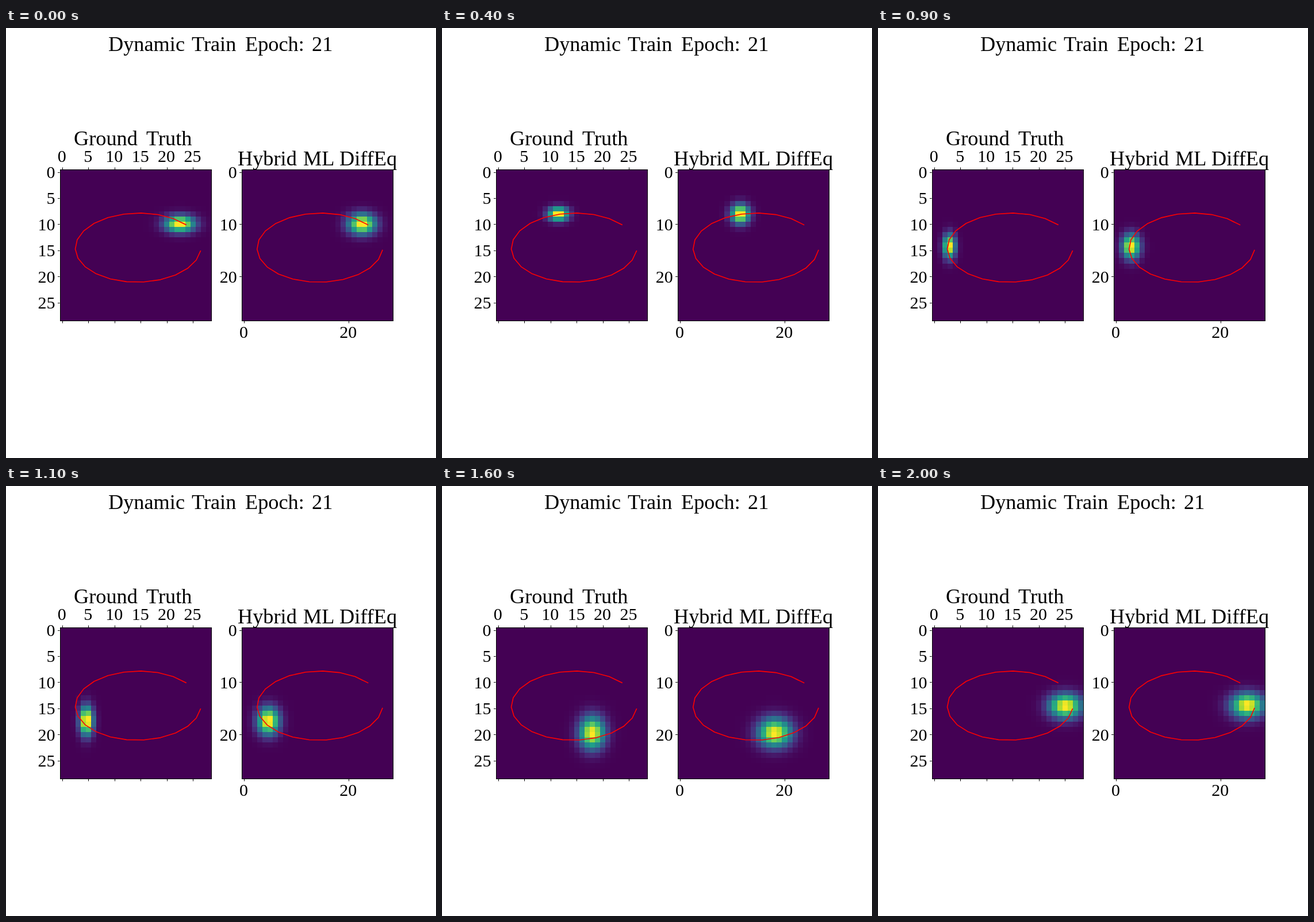
An HTML page that plays this animation: 748x748 px, repeating every 2.1 s.

```html
<!DOCTYPE html>
<html lang="en">
<head>
<meta charset="utf-8">
<title>Dynamic Train</title>
<style>
html, body { margin: 0; width: 100%; height: 100%; overflow: hidden; background: #fff; }
svg { display: block; width: 748px; height: 748px; }
text { font-family: "Liberation Serif", "Times New Roman", serif; fill: #000; }
.title { font-size: 36.3px; }
.label { font-size: 30px; }
.axis { fill: none; stroke: #000; stroke-width: 1; }
.orbit { fill: none; stroke: #f00; stroke-width: 1.6; stroke-linejoin: round; stroke-linecap: square; }
</style>
</head>
<body>
<svg id="stage" viewBox="0 0 748 748"></svg>
<script>
const STEP = 100, COUNT = 21, GRID = 29;
const SIZE = 263.5, CELL = SIZE / GRID, TOP = 246, BOTTOM = TOP + SIZE;
const VIRIDIS = ['440154', '482878', '3e4989', '31688e', '26828e', '1f9e89', '35b779', '6ece58', 'b5de2b', 'fde725']
  .map(hex => [0, 2, 4].map(i => parseInt(hex.slice(i, i + 2), 16)));
const RAD = Math.PI / 180;

// turn: degrees per step; spreads: mean, swing and phase of the pulse width along each axis.
const panels = [
  {
    left: 93.5, turn: 15.65,
    spreadX: { mean: 1.45, swing: 0.65, phase: 0 },
    spreadY: { mean: 1.52, swing: 0.65, phase: 0 },
    xTickStep: 5, yTickStep: 5, topLabels: true
  },
  {
    left: 409.7, turn: 15.72,
    spreadX: { mean: 1.65, swing: 0.6, phase: 35 },
    spreadY: { mean: 1.57, swing: 0.33, phase: 0 },
    xTickStep: 20, yTickStep: 10, topLabels: false
  }
];

const stage = document.getElementById('stage');

function add(tag, attrs, text) {
  const node = document.createElementNS('http://www.w3.org/2000/svg', tag);
  for (const key in attrs) node.setAttribute(key, attrs[key]);
  if (text !== undefined) node.textContent = text;
  return stage.appendChild(node);
}

const snap = v => Math.floor(v + 0.5) + 0.5;
const line = (x1, y1, x2, y2) => add('line', { x1, y1, x2, y2, class: 'axis' });
const words = (y, list) => list.forEach(([x, word]) => add('text', { x, y, class: 'title' }, word));

function viridis(value) {
  const pos = value * (VIRIDIS.length - 1);
  const i = Math.min(Math.floor(pos), VIRIDIS.length - 2);
  const mix = VIRIDIS[i].map((c, k) => Math.round(c + (VIRIDIS[i + 1][k] - c) * (pos - i)));
  return `rgb(${mix})`;
}

function orbitPoint(panel, step) {
  return {
    x: 14.5 - 12.03 * Math.sin((step - 3.17) * panel.turn * RAD),
    y: 14.47 - 6.62 * Math.cos((step - 3.1) * panel.turn * RAD)
  };
}

function bell(center, spread) {
  const values = Array.from({ length: GRID }, (_, i) => Math.exp(-((i - center) ** 2) / (2 * spread * spread)));
  const peak = Math.max(...values);
  return values.map(v => v / peak);
}

function buildPanel(panel) {
  const { left } = panel;
  const toX = v => left + (v + 0.5) * CELL;
  const toY = v => TOP + (v + 0.5) * CELL;

  panel.cells = [];
  for (let row = 0; row < GRID; row++) {
    for (let col = 0; col < GRID; col++) {
      const x = Math.round(left + col * CELL), y = Math.round(TOP + row * CELL);
      panel.cells.push(add('rect', {
        x, y,
        width: Math.round(left + (col + 1) * CELL) - x,
        height: Math.round(TOP + (row + 1) * CELL) - y
      }));
    }
  }

  const points = Array.from({ length: COUNT }, (_, step) => {
    const p = orbitPoint(panel, step);
    return `${toX(p.x).toFixed(2)},${toY(p.y).toFixed(2)}`;
  });
  add('polyline', { points: points.join(' '), class: 'orbit' });

  const x0 = snap(left), y0 = snap(TOP);
  add('rect', { x: x0, y: y0, width: snap(left + SIZE) - x0, height: snap(BOTTOM - 0.01) - y0, class: 'axis' });

  for (let v = 0; v < GRID; v += panel.xTickStep) {
    const x = snap(toX(v));
    line(x, BOTTOM, x, BOTTOM + 4);
    if (panel.topLabels) line(x, TOP, x, TOP - 3.5);
    add('text', { x: toX(v) - 0.7, y: panel.topLabels ? 233 : 539, class: 'label', 'text-anchor': 'middle' }, v);
  }
  for (let v = 0; v < GRID; v += panel.yTickStep) {
    const y = snap(toY(v));
    line(left - 3.5, y, left, y);
    add('text', { x: left - 8, y: toY(v) + 10.5, class: 'label', 'text-anchor': 'end' }, v);
  }
}

function drawPanel(panel, step) {
  const { spreadX, spreadY } = panel;
  const angle = (step - 3.1) * panel.turn;
  const p = orbitPoint(panel, step);
  // The pulse runs on a slightly smaller orbit around the grid centre.
  const cols = bell(14 + 0.928 * (p.x - 14.5), spreadX.mean - spreadX.swing * Math.sin((angle + spreadX.phase) * RAD));
  const rows = bell(14 + 0.928 * (p.y - 14.5), spreadY.mean - spreadY.swing * Math.cos((angle + spreadY.phase) * RAD));
  panel.cells.forEach((cell, i) => {
    cell.setAttribute('fill', viridis(cols[i % GRID] * rows[Math.floor(i / GRID)]));
  });
}

panels.forEach(buildPanel);
words(40, [[178, 'Dynamic'], [323, 'Train'], [416, 'Epoch:'], [532, '21']]);
words(204, [[118, 'Ground'], [244, 'Truth']]);
words(239, [[403, 'Hybrid'], [517, 'ML'], [580, 'DiffEq']]);

let shown = -1;
const start = performance.now();

function render(now) {
  const step = Math.floor(Math.max(0, now - start) / STEP) % COUNT;
  if (step !== shown) {
    shown = step;
    panels.forEach(panel => drawPanel(panel, step));
  }
  requestAnimationFrame(render);
}
render(start);
</script>
</body>
</html>
```
